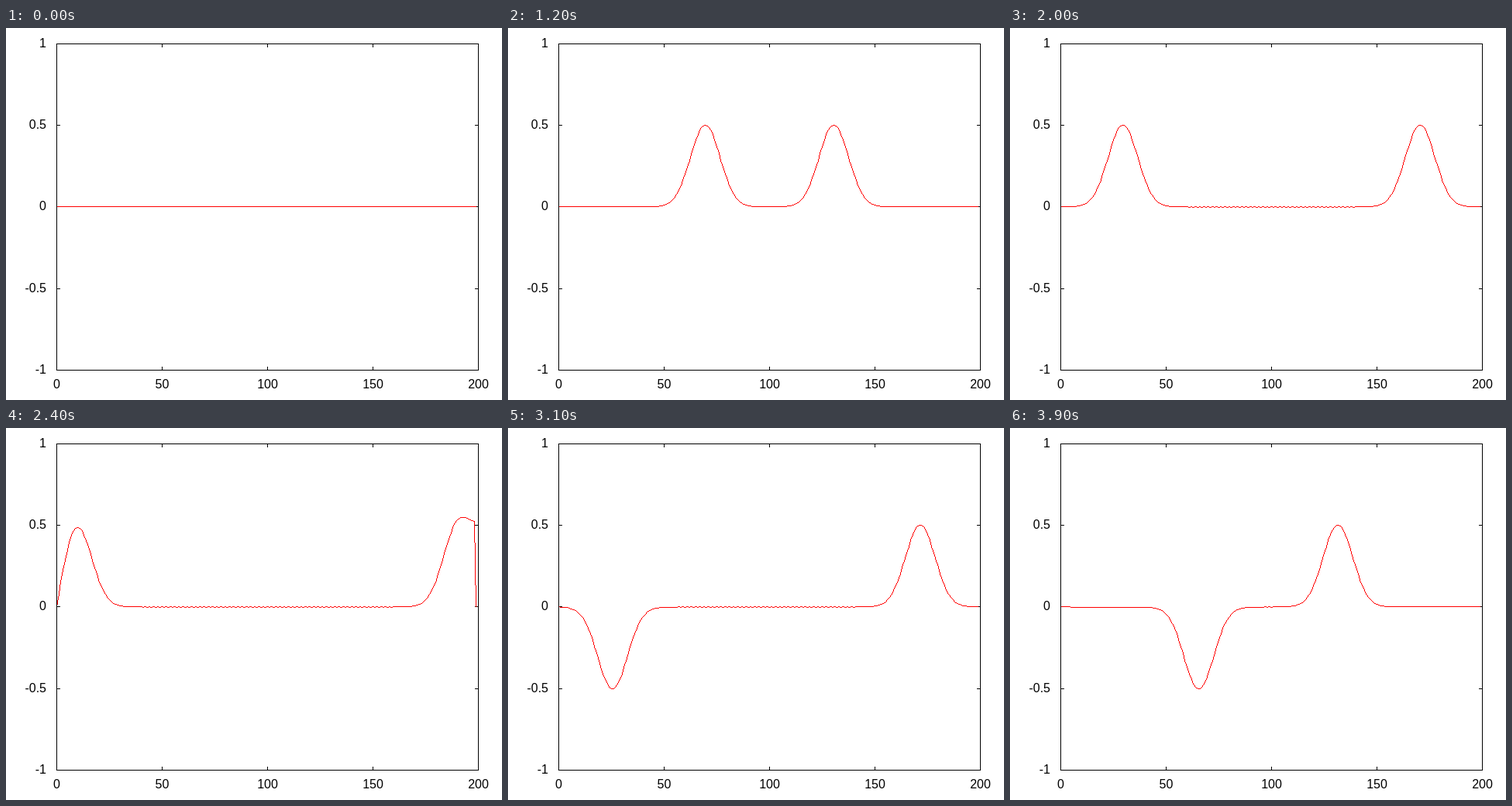
Animation, 640 px wide and 480 px high, one loop 4 s. Source, as an HTML page:

```html
<!DOCTYPE html>
<html lang="en">
<head>
<meta charset="utf-8">
<title>Pulse between two walls</title>
<style>
  html, body { margin: 0; width: 100%; height: 100%; overflow: hidden; background: #fff; }
  svg { display: block; }
  text { font: 16px "Liberation Sans", Arial, sans-serif; fill: #000; }
</style>
</head>
<body>
<svg width="640" height="480" viewBox="0 0 640 480">
  <path id="ticks" shape-rendering="crispEdges"/>
  <path id="wave" fill="#f00" shape-rendering="crispEdges"/>
  <path id="border" shape-rendering="crispEdges"/>
  <g id="labels"></g>
</svg>
<script>
const LEFT = 65, RIGHT = 609, TOP = 20, BOTTOM = 441;
const CELLS = 200, MID = 100, STEPS = 5, FRAMES = 40, FRAME_MS = 100;
const $ = id => document.getElementById(id);

const px = x => LEFT + Math.floor(x * (RIGHT - LEFT) / 200 + 0.5);
const py = v => BOTTOM - Math.floor((v + 1) * (BOTTOM - TOP) / 2 + 0.5);
const box = (x, y, w, h) => `M${x} ${y}h${w}v${h}h${-w}z`;

function label(text, x, y, anchor) {
  const el = document.createElementNS("http://www.w3.org/2000/svg", "text");
  el.setAttribute("x", x);
  el.setAttribute("y", y);
  el.setAttribute("text-anchor", anchor);
  el.textContent = text;
  $("labels").append(el);
}

function drawAxes() {
  let ticks = "";
  for (let v = 0; v <= 200; v += 50) {
    const x = px(v);
    ticks += box(x, TOP, 1, 5) + box(x, BOTTOM - 4, 1, 5);
    label(v, x + 0.5, 465, "middle");
  }
  for (let v = -1; v <= 1; v += 0.5) {
    const y = py(v);
    ticks += box(LEFT, y, 5, 1) + box(RIGHT - 4, y, 5, 1);
    label(v, 52, y + 5, "end");
  }
  $("ticks").setAttribute("d", ticks);
  const w = RIGHT - LEFT + 1, h = BOTTOM - TOP + 1;
  $("border").setAttribute("d",
    box(LEFT, TOP, w, 1) + box(LEFT, BOTTOM, w, 1) +
    box(LEFT, TOP, 1, h) + box(RIGHT, TOP, 1, h));
}

// One-pixel Bresenham segment, always walked in the positive direction.
function segment(x1, y1, x2, y2) {
  const dx = Math.abs(x2 - x1), dy = Math.abs(y2 - y1);
  if (dy === 0) return box(x1, y1, dx + 1, 1);
  const steep = dy > dx;
  if (steep ? y1 > y2 : x1 > x2) [x1, y1, x2, y2] = [x2, y2, x1, y1];
  const long = Math.max(dx, dy), short = Math.min(dx, dy);
  const sx = Math.sign(x2 - x1), sy = Math.sign(y2 - y1);
  let d = 2 * short - long, x = x1, y = y1, path = box(x, y, 1, 1);
  for (let i = 0; i < long; i++) {
    const side = d >= 0;
    d += 2 * short - (side ? 2 * long : 0);
    if (steep || side) y += sy;
    if (!steep || side) x += sx;
    path += box(x, y, 1, 1);
  }
  return path;
}

function curve(e) {
  let path = "";
  for (let i = 1; i < CELLS; i++) {
    path += segment(px(i - 1), py(e[i - 1]), px(i), py(e[i]));
  }
  return path;
}

// 1D field solver: the left wall inverts the pulse, the right one does not.
function simulate() {
  const e = new Float64Array(CELLS), h = new Float64Array(CELLS), out = [];
  for (let t = 0; t < FRAMES * STEPS; t++) {
    for (let i = 0; i < CELLS - 2; i++) h[i] += e[i + 1] - e[i];
    for (let i = 1; i < CELLS - 1; i++) e[i] += h[i] - h[i - 1];
    e[MID] += Math.exp(-((t - 30) ** 2) / 100);
    if (t % STEPS === 0) out.push(curve(e));
  }
  return out;
}

drawAxes();
const curves = simulate();
const start = performance.now();
let shown = -1;

function update() {
  const n = Math.floor((performance.now() - start) / FRAME_MS) % FRAMES;
  if (n !== shown) $("wave").setAttribute("d", curves[shown = n]);
  requestAnimationFrame(update);
}
update();
</script>
</body>
</html>
```
